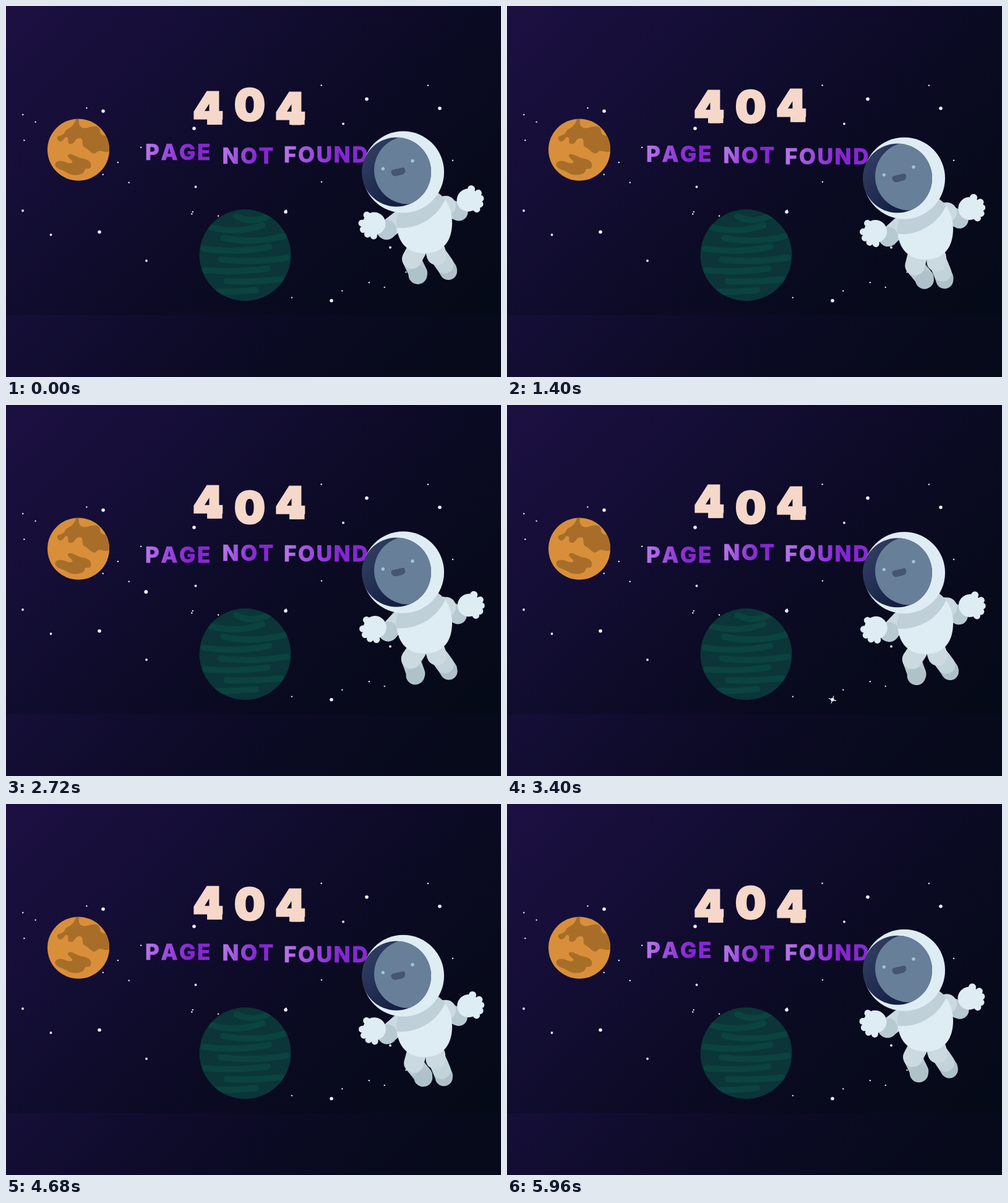
An HTML page with a canvas that plays this animation: 800 px wide and 600 px high, repeating every 6 s.

```html
<!DOCTYPE html>
<html lang="en">
<head>
<meta charset="utf-8">
<title>404</title>
<style>
html, body { margin: 0; width: 100%; height: 100%; overflow: hidden; background: #0c0a26; }
canvas { display: block; }
</style>
</head>
<body>
<canvas id="stage" width="800" height="600"></canvas>
<script>
const ctx = document.getElementById('stage').getContext('2d');
const LOOP = 6000, TAU = Math.PI * 2, DEG = Math.PI / 180;

// ---------- helpers ----------
function disc(x, y, r, fill) {
  ctx.fillStyle = fill;
  ctx.beginPath();
  ctx.arc(x, y, r, 0, TAU);
  ctx.fill();
}

function capsule(x1, y1, x2, y2, w, color) {
  ctx.strokeStyle = color;
  ctx.lineWidth = w;
  ctx.lineCap = 'round';
  ctx.beginPath();
  ctx.moveTo(x1, y1);
  ctx.lineTo(x2, y2);
  ctx.stroke();
}

function clipDisc(x, y, r) {
  ctx.beginPath();
  ctx.arc(x, y, r, 0, TAU);
  ctx.clip();
}

function turned(x, y, deg, draw) {
  ctx.save();
  ctx.translate(x, y);
  ctx.rotate(deg * DEG);
  ctx.translate(-x, -y);
  draw();
  ctx.restore();
}

function blend(x1, y1, x2, y2, colors) {
  const g = ctx.createLinearGradient(x1, y1, x2, y2);
  colors.forEach((c, i) => g.addColorStop(i / (colors.length - 1), c));
  return g;
}

function seeded(seed) {
  return () => (seed = (seed * 16807) % 2147483647) / 2147483647;
}

// Cosine sway, highest value at time peak
const sway = (t, period, peak) => Math.cos((t - peak) / period * TAU);

// ---------- sky ----------
const SKY = ['#1c1042', '#150e37', '#0d0b28', '#080a1d', '#050a17'];

function sky() {
  ctx.fillStyle = blend(0, 0, 650, 650, SKY);
  ctx.fillRect(0, 0, 800, 500);
  ctx.fillStyle = blend(0, 200, 650, 850, SKY);
  ctx.fillRect(0, 500, 800, 100);
}

const BRIGHT = [[157, 170], [304, 198], [583, 150.5], [701, 165.5], [151, 365.5], [452, 333], [526, 476.5]];
const MEDIUM = [[27, 331], [72.5, 370], [227, 412], [621, 390.5], [545, 190.5], [306.5, 292.5]];
const rnd = seeded(404);
const DUST = Array.from({ length: 26 }, () => [25 + rnd() * 730, 127 + rnd() * 345]);

function glint([x, y], peak, t) {
  const s = 1 - Math.abs(t - peak) / 340;
  if (s <= 0) return;
  turned(x, y, 45 * (1 - s), () => {
    const r = 10 * s;
    capsule(x - r, y, x + r, y, 1.2, '#f4f1ff');
    capsule(x, y - r, x, y + r, 1.2, '#f4f1ff');
  });
}

function stars(t) {
  for (const [x, y] of BRIGHT) disc(x, y, 2.8, '#f1edfb');
  for (const [x, y] of MEDIUM) disc(x, y, 1.9, '#f1edfb');
  for (const [x, y] of DUST) disc(x, y, 1.2, '#f1edfb');
  glint(BRIGHT[6], 3540, t);
  glint(MEDIUM[5], 4260, t);
  glint(BRIGHT[2], 5280, t);
  if (t > 1980 && t < 2960) {
    const u = (t - 1980) / 740;
    disc(777 - 550 * u, 113 + 189 * u, 2.9 * Math.min(1, (2960 - t) / 200), '#f6f3ff');
  }
}

// ---------- planets ----------
const LAND = new Path2D('M83 215C80 208 92 212 95 204C98 196 108 200 113 183L118 183'
  + 'C116 194 122 199 131 197C142 193 152 193 152 203C153 211 160 208 168 212L168 235'
  + 'C158 239 152 230 146 237C140 243 134 231 126 228C121 225 127 214 119 214'
  + 'C110 214 113 223 104 223C96 222 105 211 96 212C91 220 86 222 83 215Z');
const LAKE = new Path2D('M82 252C92 247 98 256 106 254C112 251 98 246 100 241C106 236 114 246 126 247'
  + 'C136 249 140 256 136 262C132 265 128 261 127 266C126 273 112 275 103 272C96 268 92 266 86 264C78 260 78 254 82 252Z');

function amberPlanet() {
  ctx.save();
  clipDisc(117, 232.5, 50);
  ctx.fillStyle = '#d98f3a';
  ctx.fillRect(60, 180, 120, 110);
  ctx.fillStyle = '#a86e29';
  ctx.fill(LAND);
  ctx.fill(LAKE);
  ctx.restore();
}

function greenPlanet() {
  ctx.save();
  clipDisc(386.5, 403, 74);
  ctx.fillStyle = '#0b3538';
  ctx.fillRect(310, 325, 155, 155);
  ctx.strokeStyle = '#0a4340';
  ctx.lineCap = 'round';
  // Sagging bands, pushed left and right in turn
  for (let i = 0; i < 8; i++) {
    const y = 340 + i * 17.5;
    const half = Math.sqrt(74 * 74 - (y - 403) ** 2) * 0.72;
    const x = 386.5 + (i % 2 ? -14 : 14);
    const sag = 14 - i * 2;
    ctx.lineWidth = 10;
    ctx.beginPath();
    ctx.moveTo(x - half, y);
    ctx.quadraticCurveTo(x, y + sag, x + half, y - 3);
    ctx.stroke();
  }
  ctx.restore();
}

// ---------- lettering ----------
function digit(ch, x, y) {
  ctx.fillText(ch, x, y);
  ctx.strokeText(ch, x, y);
  if (ch === '4') ctx.fillRect(x - 1.5, y - 9, 24.5, 10.5);
}

function word(text, x, y) {
  const w = ctx.measureText(text).width;
  const paint = blend(x, y - 20, x + w, y, ['#b678e8', '#9b4bdc', '#8424cf', '#8a2bd8']);
  ctx.fillStyle = ctx.strokeStyle = paint;
  ctx.fillText(text, x, y);
  ctx.strokeText(text, x, y);
}

function lettering(t) {
  ctx.lineJoin = 'miter';
  ctx.miterLimit = 3;
  ctx.fontKerning = 'none';
  ctx.textAlign = 'center';
  ctx.letterSpacing = '0px';
  ctx.font = '900 70px Inter, sans-serif';
  ctx.fillStyle = ctx.strokeStyle = '#f5d8c9';
  ctx.lineWidth = 3;
  digit('4', 326.5, 186 + 4.7 * sway(t, LOOP, 300));
  digit('0', 394, 188 - 2.9 * sway(t, LOOP, 0));
  digit('4', 459.5, 187 + 3.7 * sway(t, LOOP, -300));

  ctx.textAlign = 'left';
  ctx.letterSpacing = '2.6px';
  ctx.font = '800 35px Inter, sans-serif';
  ctx.lineWidth = 0.6;
  word('PAGE', 225, 252.3 - 3 * sway(t, LOOP, 0));
  word('NOT', 349.5, 253.3 + 2.2 * sway(t, LOOP, 400));
  word('FOUND', 449, 254.5 - 1.7 * sway(t, LOOP / 2, 0));
}

// ---------- astronaut ----------
const SUIT = '#deecf4', SOFT = '#cbdae1', SHADE = '#b7c9d1';

function hand(x, y, from, step) {
  disc(x, y, 18.5, SUIT);
  for (let i = 0; i < 4; i++) {
    const a = (from + step * i) * DEG;
    capsule(x, y, x + 20 * Math.cos(a), y + 20 * Math.sin(a), 11, SUIT);
  }
}

function leftArm() {
  capsule(636, 346, 617, 361, 30, SOFT);
  disc(615, 362, 16, SHADE);
  hand(595, 352, 92, 30);
  capsule(595, 348, 583, 338, 11, SUIT);
}

function rightArm() {
  capsule(704, 322, 732, 333, 29, SHADE);
  disc(711, 323, 16, SOFT);
  hand(747, 314, -35, 27);
  capsule(746, 312, 752, 296, 12, SUIT);
}

function leftLeg() {
  capsule(656, 411, 666, 432, 30, SHADE);
  disc(665.5, 435, 15, '#afc2ca');
  capsule(663, 396, 656, 409, 32, SOFT);
}

function rightLeg() {
  capsule(702, 408, 714, 426, 29, SHADE);
  disc(715, 429, 14, '#aec1c9');
  capsule(699, 404, 709, 418, 29, '#c3d3da');
  capsule(694, 396, 696, 403, 32, SOFT);
}

// Even swing to mid, then an eased swing to end, mirrored in the second half
function kick(t, mid, end, overshoot) {
  const u = Math.min(t, LOOP - t) / 1500;
  if (u < 1) return mid * u;
  const q = u - 2;
  return mid + (end - mid) * (1 + (overshoot + 1) * q ** 3 + overshoot * q * q);
}

function torso() {
  ctx.save();
  ctx.beginPath();
  ctx.moveTo(631, 345);
  ctx.bezierCurveTo(630, 378, 645, 400, 676, 400);
  ctx.bezierCurveTo(708, 400, 721, 378, 721, 350);
  ctx.bezierCurveTo(721, 328, 712, 312, 698, 302);
  ctx.lineTo(640, 310);
  ctx.closePath();
  ctx.fillStyle = SUIT;
  ctx.fill();
  ctx.clip();
  disc(638, 280, 79, '#bfd0d8');
  ctx.restore();
}

function helmet() {
  disc(642, 268.5, 66, SUIT);
  ctx.save();
  clipDisc(631, 268.5, 56);
  ctx.fillStyle = blend(575, 250, 640, 300, ['#2f3c60', '#222e53', '#151f42']);
  ctx.fillRect(570, 208, 125, 122);
  disc(650, 265.5, 55, '#687f99');
  ctx.restore();
  disc(609.3, 263.2, 2.6, '#a3c3df');
  disc(657, 250.5, 2.7, '#a3c3df');
  turned(634, 268, -13, () => {
    ctx.fillStyle = '#465570';
    ctx.beginPath();
    ctx.roundRect(622.5, 263, 23, 11, [4, 4, 6.5, 6.5]);
    ctx.fill();
  });
}

function astronaut(t) {
  const ramp = 1 - Math.abs((t % 3000) / 1500 - 1);
  const reach = (1 - sway(t, LOOP, 0)) / 2;
  ctx.save();
  ctx.translate(0, 10.6 * ramp);
  turned(661, 396, kick(t, -15, 6, 0), leftLeg);
  turned(692, 396, kick(t, 13.5, 0, 3), rightLeg);
  turned(632, 346, -9 * reach, leftArm);
  turned(702, 325, 10 * reach, rightArm);
  torso();
  helmet();
  ctx.restore();
}

function frame(t) {
  sky();
  stars(t);
  amberPlanet();
  greenPlanet();
  lettering(t);
  astronaut(t);
}

const start = performance.now();
function tick() {
  frame(Math.max(0, performance.now() - start) % LOOP);
  requestAnimationFrame(tick);
}
tick();
</script>
</body>
</html>
```
